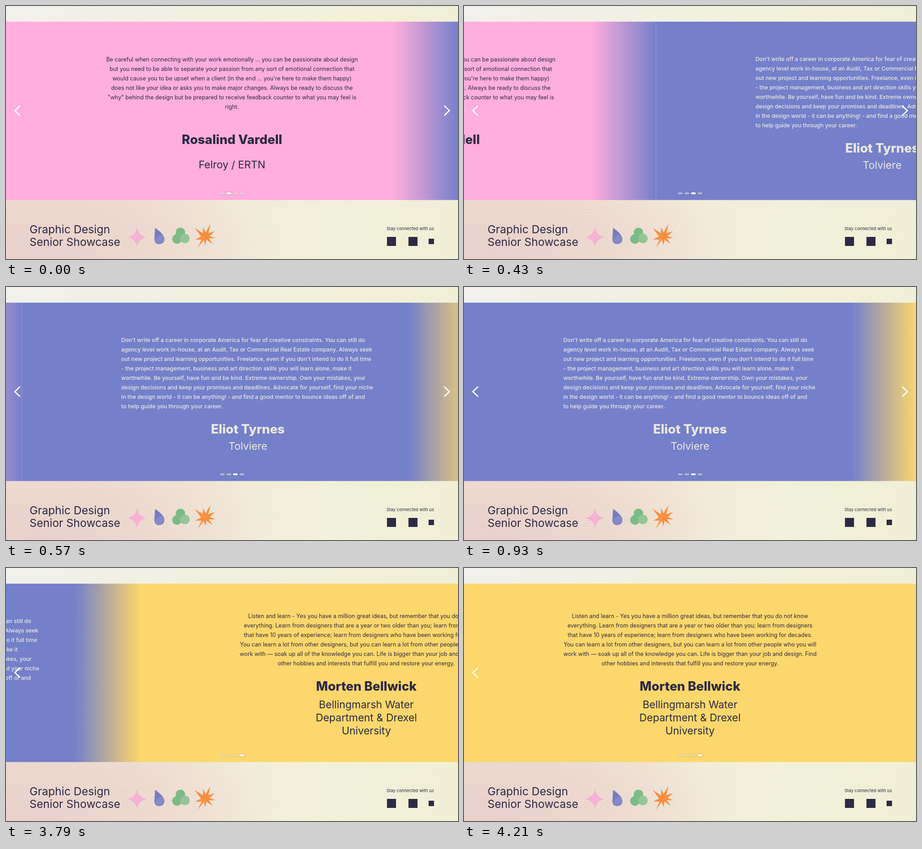
An HTML page for the animation above (5890 ms loop, 999 by 561 pixels).

```html
<!DOCTYPE html>
<html lang="en">
<head>
<meta charset="utf-8">
<title>Senior Showcase</title>
<style>
  html, body { margin: 0; width: 100%; height: 100%; overflow: hidden; }
  body {
    background:
      repeating-radial-gradient(circle at 270px 610px, #fff0 0 3px, #ffffff1c 4px 5px, #fff0 6px),
      repeating-radial-gradient(circle at 640px -60px, #fff0 0 3px, #ffffff1c 4px 5px, #fff0 6px),
      linear-gradient(90deg, #f0efeb, #f0f0df 45%, #f1f0d5 75%, #efeed4) 0 0 / 100% 35px no-repeat,
      radial-gradient(ellipse 520px 240px at 60px 540px, #e8cdc8, #ebd6cc 45%, #ebd6cc00) 0 0 / 100% 100% no-repeat,
      linear-gradient(90deg, #eadcd0, #f0e8d5 45%, #f1f0d7 70%, #efeed3);
  }
  svg { display: block; width: 999px; height: 561px; }
  text { font-family: Inter, "Open Sans", sans-serif; font-optical-sizing: none; fill: #2c2a45; }
  .body { font-size: 12.45px; }
  .name { font-size: 27.8px; font-weight: 800; }
  .firm { font-size: 22.9px; }
  .light text { fill: #ebe8de; }
  .light .body { font-size: 12.3px; font-weight: 500; }
  .mid { text-anchor: middle; }
  .title { font-size: 24.5px; }
  .small { font-size: 9.5px; }
  .arrow { fill: none; stroke: #fff; stroke-width: 2.6; }
  #dots { filter: drop-shadow(0 0 1px #3338); }
</style>
</head>
<body>
<svg viewBox="0 0 999 561">
  <defs>
    <clipPath id="band"><rect y="34.7" width="999" height="395.5"/></clipPath>
    <pattern id="speckle" width="3" height="3" patternUnits="userSpaceOnUse" patternTransform="rotate(25)">
      <circle cx="1.5" cy="1.5" r=".75" fill="#eee3d6" opacity=".75"/>
    </pattern>
  </defs>

  <g clip-path="url(#band)"><g id="track"></g></g>

  <path class="arrow" d="M31 221 19.5 232 31 243"/>
  <path id="next" class="arrow" d="M968.5 221 980 232 968.5 243"/>
  <g id="dots"></g>

  <text class="title" x="52" y="504">Graphic Design</text>
  <text class="title" x="52" y="531.5">Senior Showcase</text>

  <path fill="#f5b2d5" d="M289.5 490Q292 509 311 512.5 292 516 289.5 535 287 516 267 512.5 287 509 289.5 490Z"/>
  <path fill="#747dc2" d="M329.5 492C338 498 350 507 350 517 350 524 345 528 338 528 331 528 328 523 328 516Z"/>
  <path fill="url(#speckle)" d="M331 514 344 506Q350 512 349 519 346 527 338 527 331 526 330 520Z"/>
  <g fill="#7dbb86">
    <circle cx="385.5" cy="502" r="10.5"/>
    <circle cx="378" cy="516.5" r="10.7"/>
    <circle cx="395.5" cy="515.5" r="10.5" fill="#8cc291"/>
    <circle cx="395.5" cy="515.5" r="10.5" fill="url(#speckle)" opacity=".6"/>
  </g>
  <path fill="#fa8f3e" d="M452 483 447 504 462 499 450 510 463 515 448 515 457 528 443 518 441 530 437 519 424 536 432 518 418 518 431 511 417 492 435 504 436 490 441 502Z"/>
  <path fill="url(#speckle)" opacity=".5" d="M424 536 432 518 437 508 440 516 437 519Z"/>

  <text class="small" x="841" y="497">Stay connected with us</text>
  <g fill="#2c2a45">
    <rect x="842" y="512" width="20" height="20"/>
    <rect x="889.5" y="512" width="20" height="20"/>
    <rect x="934" y="516" width="12" height="12"/>
  </g>
</svg>

<script>
const PINK = '#ffaedd', BLUE = '#7480ca', GOLD = '#fcd76b';
const PITCH = 1000, LOOP = 5890, FPS = 14, SLIDE_MS = 332;
const STARTS = [318, 3648];

const slides = [
  { from: PINK, to: BLUE, x: 499.5, y: 122.5, nameY: 306, firmY: 360,
    lines: ['Be careful when connecting with your work emotionally ... you can be passionate about design',
      'but you need to be able to separate your passion from any sort of emotional connection that',
      "would cause you to be upset when a client (in the end ... you're here to make them happy)",
      'does not like your idea or asks you to make major changes. Always be ready to discuss the',
      '"why" behind the design but be prepared to receive feedback counter to what you may feel is',
      'right.'],
    name: 'Rosalind Vardell', firm: ['Felroy / ERTN'] },
  { from: BLUE, to: GOLD, x: 219.5, y: 122, nameY: 324.5, firmY: 360.5, light: true,
    lines: ["Don't write off a career in corporate America for fear of creative constraints. You can still do",
      'agency level work in-house, at an Audit, Tax or Commercial Real Estate company. Always seek',
      "out new project and learning opportunities. Freelance, even if you don't intend to do it full time",
      '- the project management, business and art direction skills you will learn alone, make it',
      'worthwhile. Be yourself, have fun and be kind. Extreme ownership. Own your mistakes, your',
      'design decisions and keep your promises and deadlines. Advocate for yourself, find your niche',
      'in the design world - it can be anything! - and find a good mentor to bounce ideas off of and',
      'to help guide you through your career.'],
    name: 'Eliot Tyrnes', firm: ['Tolviere'] },
  { from: GOLD, to: GOLD, x: 499.5, y: 111, nameY: 271.5, firmY: 310.5,
    lines: ['Listen and learn - Yes you have a million great ideas, but remember that you do not know',
      'everything. Learn from designers that are a year or two older than you; learn from designers',
      'that have 10 years of experience; learn from designers who have been working for decades.',
      'You can learn a lot from other designers, but you can learn a lot from other people who you will',
      'work with — soak up all of the knowledge you can. Life is bigger than your job and design. Find',
      'other hobbies and interests that fulfill you and restore your energy.'],
    name: 'Morten Bellwick', firm: ['Bellingmarsh Water', 'Department &amp; Drexel', 'University'] }
];

const byId = id => document.getElementById(id);
const track = byId('track'), dots = byId('dots'), next = byId('next');

const texts = (lines, cls, x, y, step) => lines.map((line, i) =>
  `<text class="${cls}" x="${x}" y="${y + i * step}">${line}</text>`).join('');

track.innerHTML = slides.map((s, i) => `
  <linearGradient id="fade${i}">
    <stop offset=".855" stop-color="${s.from}"/><stop offset="1" stop-color="${s.to}"/>
  </linearGradient>
  <g transform="translate(${i * PITCH})" class="${s.light ? 'light' : ''}">
    <rect y="34" width="${PITCH + 1}" height="397" fill="url(#fade${i})"/>
    ${i ? '<rect x="-1" y="34" width="1" height="397" fill="#fff" opacity=".2"/>' : ''}
    ${texts(s.lines, s.light ? 'body' : 'body mid', s.x, s.y, 21)}
    ${texts([s.name], 'name mid', 499.5, s.nameY, 0)}
    ${texts(s.firm, 'firm mid', 499.5, s.firmY, 29)}
  </g>`).join('');

dots.innerHTML = [0, 1, 2, 3].map(i =>
  `<rect x="${473 + i * 14.4}" y="413.2" width="10.4" height="4.3" rx="1.8" fill="#fff"/>`).join('');

// CSS "ease": cubic-bezier(.25, .1, .25, 1), solved for x by bisection
function ease(x) {
  if (x <= 0 || x >= 1) return x <= 0 ? 0 : 1;
  const bezier = (a, b, u) => 3 * a * u * (1 - u) ** 2 + 3 * b * u * u * (1 - u) + u ** 3;
  let lo = 0, hi = 1;
  for (let i = 0; i < 24; i++) {
    const mid = (lo + hi) / 2;
    if (bezier(.25, .25, mid) < x) lo = mid; else hi = mid;
  }
  return bezier(.1, 1, lo);
}

function draw(now) {
  // Time advances in steps of 1/14 s; the 6 ms absorb rounding to 10 ms
  const t = Math.floor((now % LOOP + 6) * FPS / 1000) * 1000 / FPS;
  const pos = STARTS.reduce((sum, s) => sum + ease((t - s) / SLIDE_MS), 0);
  const active = 1 + STARTS.filter(s => t >= s).length;
  track.setAttribute('transform', `translate(${-pos * PITCH})`);
  [...dots.children].forEach((d, i) => d.setAttribute('fill-opacity', i === active ? 1 : .5));
  next.style.display = active === 3 ? 'none' : '';
  requestAnimationFrame(() => draw(performance.now()));
}
draw(performance.now());
</script>
</body>
</html>
```
